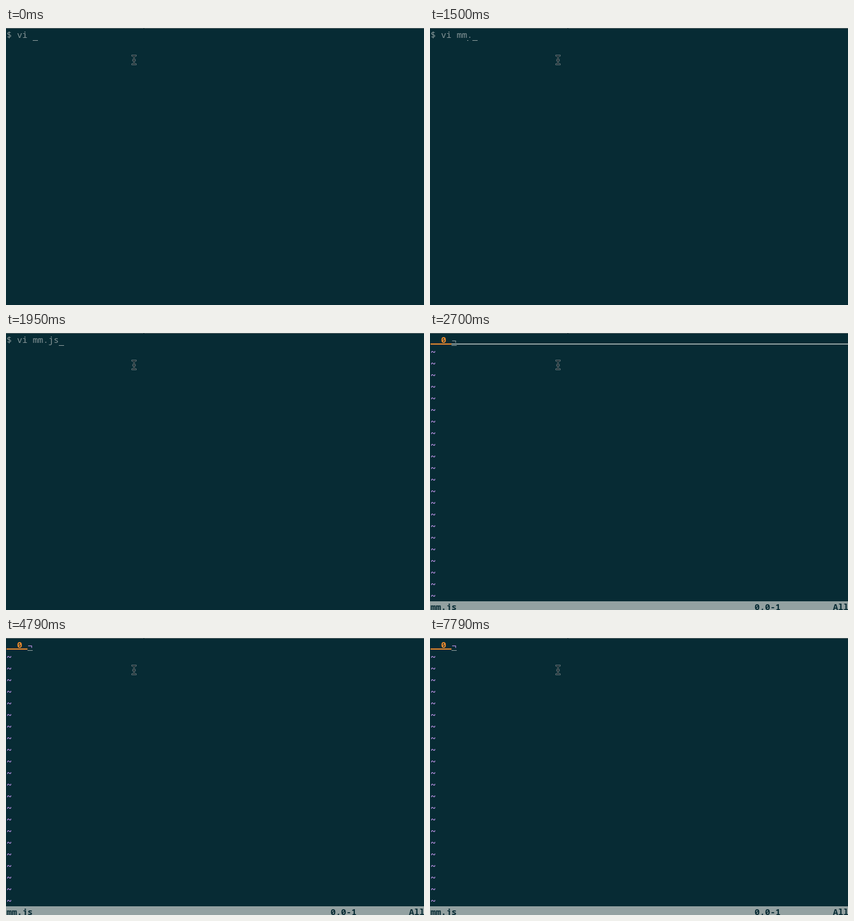
An HTML page with a canvas for the animation above (8 s loop, 720 by 477 pixels).

```html
<!DOCTYPE html>
<html lang="en">
<head>
<meta charset="utf-8">
<title>Terminal session</title>
<style>
  html, body { margin: 0; width: 100%; height: 100%; overflow: hidden; background: #072b34; }
  canvas { display: block; width: 720px; height: 477px; }
</style>
</head>
<body>
<canvas id="stage" width="720" height="477"></canvas>
<script>
const ctx = document.getElementById('stage').getContext('2d');
const LOOP = 8000, CELL = 9, ROW = 20, LEFT = 1, BASE = 17;
const BG = '#072b34', GRAY = '#849496', PALE = '#93a1a1', ORANGE = '#ee8a2e', PURPLE = '#cc9bf5';

// Each step: start time, then the state that holds until the next step.
const steps = [
  { at: 0, text: '', col: 5 },
  { at: 600, text: 'm', col: 6 },
  { at: 750, text: 'mm', col: 7 },
  { at: 1500, text: 'mm.', col: 8, trace: true },
  { at: 1650, text: 'mm.', col: 8 },
  { at: 1950, text: 'mm.js', col: 10 },
  { at: 2400, text: 'mm.js' },
  { at: 2550, text: 'mm.js', col: 0, row: 1 },
  { at: 2700, editor: true, lineShown: true },
  { at: 4790, editor: true },
  { at: 7190, editor: true, lineShown: true },
  { at: 7790, editor: true }
];

function rect(x, y, w, h, color) {
  ctx.fillStyle = color;
  ctx.fillRect(x, y, w, h);
}

function write(text, col, row, color, weight = 500, shift = 0) {
  ctx.font = `${weight} 15px "Noto Sans Mono", "DejaVu Sans Mono", monospace`;
  ctx.fillStyle = color;
  ctx.fillText(text, LEFT + col * CELL, BASE + row * ROW + shift);
}

function cursor(col, row = 0) {
  rect(LEFT + col * CELL, 21 + row * ROW, CELL, 1, PALE);
}

function pointer() {
  const beam = new Path2D('M217.5 47.5H219.5L220.5 48.5L221.5 47.5H223.5 M220.5 48.5V61.5 ' +
    'M217.5 62.5H219.5L220.5 61.5L221.5 62.5H223.5 M219 55.5H222');
  ctx.lineCap = 'square';
  for (const [color, width] of [['#7d8b8e', 2.6], ['#06161b', 1.1]]) {
    ctx.strokeStyle = color;
    ctx.lineWidth = width;
    ctx.stroke(beam);
  }
}

function drawPrompt({ text, col, row, trace }) {
  write('$ vi ' + text, 0, 0, GRAY);
  if (trace) rect(64, 21, 2, 1, PALE);
  if (col !== undefined) cursor(col, row);
}

function drawEditor({ lineShown }) {
  write('0', 2, 0, ORANGE, 600);
  rect(1, 18, 36, 2, ORANGE);
  if (lineShown) rect(37, 18, 683, 2, PALE);
  write('¬', 4, 0, lineShown ? PALE : PURPLE, 500, 2);
  cursor(4);
  for (let row = 1; row <= 22; row++) write('~', 0, row, PURPLE, 600, 1);
  rect(0, 462, 720, 15, PALE);
  write('mm.js', 0, 23, BG, 600);
  write('0,0-1', 62, 23, BG, 600);
  write('All', 77, 23, BG, 600);
}

function draw(time) {
  const step = steps.findLast(s => s.at <= time);
  rect(0, 0, 720, 477, BG);
  rect(0, 0, 720, 1, '#5b6668');
  rect(237, 0, 1, 1, '#12262c');
  (step.editor ? drawEditor : drawPrompt)(step);
  pointer();
}

const start = performance.now();
function tick() {
  draw((performance.now() - start) % LOOP);
  requestAnimationFrame(tick);
}
tick();
</script>
</body>
</html>
```
